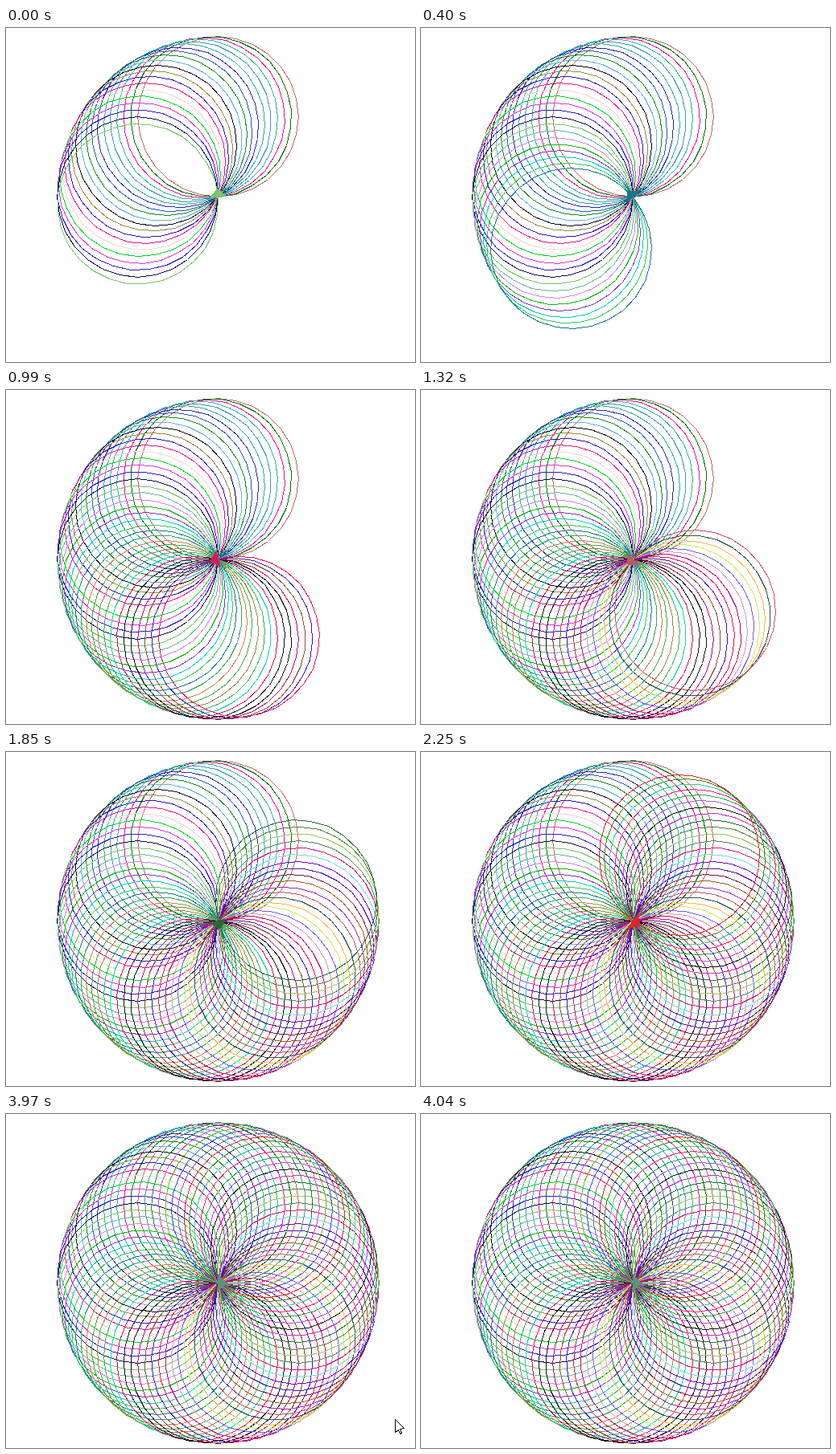
These frames come from a looping animation (508 px wide and 416 px high, 5100 ms). An HTML page:

```html
<!DOCTYPE html>
<html>
<head>
<meta charset="utf-8">
<style>
  html, body { margin: 0; width: 100%; height: 100%; overflow: hidden; background: #fff; }
  svg { display: block; }
</style>
</head>
<body>
<svg width="508" height="416" viewBox="0 0 508 416" shape-rendering="crispEdges">
  <g id="circles" fill="none"></g>
  <polygon id="turtle" points="0,-10 0,10 10,0"/>
  <polygon id="pointer" points="483.5,380.5 483.5,396.5 487.5,393.5 489.5,398.5 491.5,397.5 489.5,392.5 494.5,391.5" fill="#fff" stroke="#000"/>
</svg>
<script>
const LOOP = 5100, TICK = 66.18, STEP = 5, RADIUS = 100, SIDES = 28;
const CX = 263.5, CY = 210.5;
const colours = (
  'b66b6b 0b6b0b e010a0 35b59a 4499bb 2fae9f 2828b0 2858b8 128a22 66b5dd 04041c 95884a ' +
  '3510bb e0159a efdccf 00d528 d838d8 3818c8 080850 78c868 68b898 c888e8 18b418 7838c8 ' +
  '00cccc 38c858 147888 38a468 c88444 44a844 988844 38b458 18d8a8 c81850 181018 101010 ' +
  'a81070 885030 4410b8 d8185c c00878 d898b8 7858e8 cce868 f8b840 345444 b85868 a028a8 ' +
  'a85428 781448 5018a8 7000c8 78d8e8 d01880 508858 98c858 488828 246838 c830b8 101010 ' +
  'a058d8 28a448 e02878 48c898 388808 d82828 8858c8 2858c8 68b838 e048a8 188448 5a9478'
).split(' ').map(hex => '#' + hex);

const find = id => document.getElementById(id);
const turtle = find('turtle'), pointer = find('pointer');

// Each circle is a 28-sided polygon passing through the centre of the stage.
const corners = Array.from({ length: SIDES }, (_, i) => {
  const a = i * 2 * Math.PI / SIDES;
  return [RADIUS * Math.sin(a), RADIUS * Math.cos(a) - RADIUS];
});

const circles = colours.map((colour, k) => {
  const a = k * STEP * Math.PI / 180, sin = Math.sin(a), cos = Math.cos(a);
  const shape = document.createElementNS('http://www.w3.org/2000/svg', 'polygon');
  shape.setAttribute('points', corners.map(([x, y]) =>
    [CX + x * cos + y * sin, CY - x * sin + y * cos].map(v => Math.floor(v) + 0.5)).join(' '));
  shape.setAttribute('stroke', colour);
  return find('circles').appendChild(shape);
});

function draw() {
  const time = performance.now() % LOOP;
  const tick = Math.floor((Math.floor(time / 10) * 10 + 5) / TICK);
  const last = Math.min(circles.length - 1, 19 + Math.max(0, Math.floor(1.37 * tick - 0.25)));

  circles.forEach((shape, k) => shape.style.display = k <= last ? '' : 'none');
  turtle.setAttribute('transform', `translate(${CX} ${CY}) rotate(${-last * STEP})`);
  turtle.setAttribute('fill', colours[last]);
  turtle.setAttribute('stroke', colours[last]);
  pointer.style.display = tick === 60 ? '' : 'none';
  requestAnimationFrame(draw);
}
draw();
</script>
</body>
</html>
```
